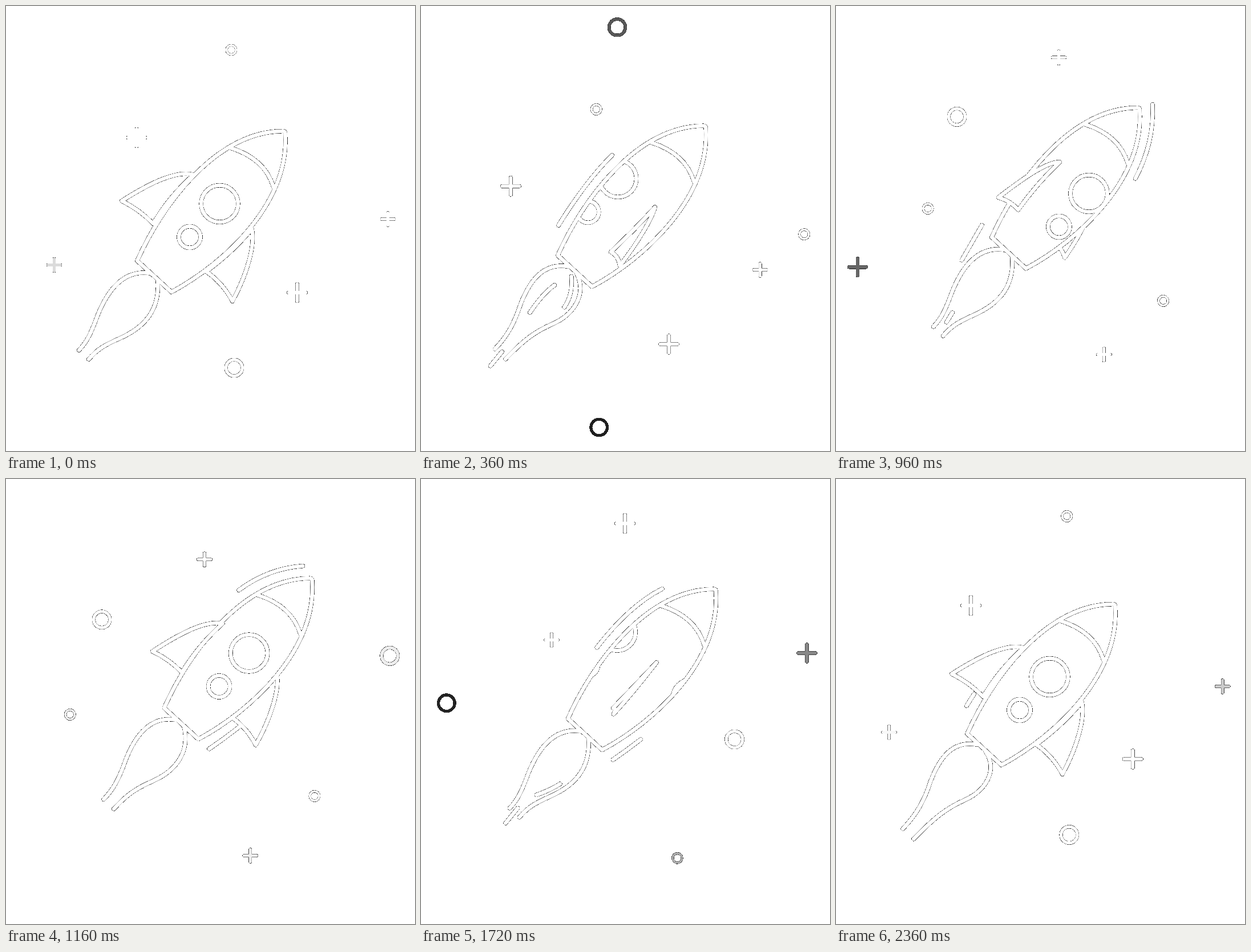
Write an HTML page with a canvas that moves like this. It is 717 by 781 pixels and loops after 2.4 s.

```html
<!DOCTYPE html>
<html lang="en">
<head>
<meta charset="utf-8">
<title>Rocket</title>
<style>
  html, body { margin: 0; width: 100%; height: 100%; overflow: hidden; background: #fff; }
  canvas { display: block; }
</style>
</head>
<body>
<canvas width="717" height="781"></canvas>
<script>
const W = 717, H = 781, LOOP = 2400, STEP = 40;
const ctx = document.querySelector('canvas').getContext('2d', { willReadFrequently: true });

// Shapes in rocket coordinates; pairs are the two ends of a morph
const BODY = new Path2D('M230 447C272 353 365 222 484 219.5Q490 219 489.5 224.5C497 346 383 452 290 502Z');
const NOSE = new Path2D('M394 249Q454 268 469 318');
const FIN = [
  'M431 391C437 420 423 470 397 518Q380 486 351 466Q399 431 431 391Z',
  'M329 296C300 288 255 309 203 342Q235 358 258 382Q287 333 329 296Z'
];
const FLAME = [
  'M252 469C205 462 178 500 161 542C148 577 142 589 128 604M266 480C270 530 247 562 200 583C175 594 160 602 145 620',
  'M247 466C205 458 182 488 166 530C155 565 140 590 117 614M262 478C286 512 260 548 228 562C196 576 175 592 136 632'
];

// Speed lines: each dash runs down its path once per lap
const streak = (d, length, first, lap) => ({ path: new Path2D(d), length, first, lap });
const STREAK_SPEED = 1.35;
const STREAKS = [
  streak('M473 198C400 203 325 242 229 398', 155, 120, 475),
  streak('M473 198C430 204 385 222 352 251C312 282 310 305 228 351', 155, 1181, LOOP),
  streak('M230 396L172 497', 71, 882, 1046),
  streak('M512 214C518 330 440 430 309 519', 136, 860, 520),
  streak('M243 489C205 505 185 540 151 596', 65, 296, 524),
  streak('M254 484C258 530 235 560 175 581', 76, 318, 426),
  streak('M142 604L112 641', 45, 315, 345)
];

// Stars drift down-left on parallel lines; x, y is the place at time 0
const STAR_SLOPE = 1.19;
const star = (draw, big, x, y, birth, death, speed, speedAfter = speed) =>
  ({ draw, big, x, y, birth, death, speed, speedAfter });
const STARS = [
  star(ring, false, 395, 77, -205, 1490, 0.2437),
  star(ring, true, 423.2, -57, 308, 1768, 0.22),
  star(ring, true, 400, 635, -1380, 403, 0.22, 0.244),
  star(ring, false, 730.6, 330.6, 150, 1960, 0.1635),
  star(plus, false, 84.5, 454.5, -1680, 300, 0.2125),
  star(plus, true, 229, 231, -880, 1100, 0.189, 0.199),
  star(plus, true, 510.5, 503, -760, 870, 0.244, 0.211),
  star(plus, false, 669.5, 374, -160, 1490, 0.208)
];

const clamp = v => Math.max(0, Math.min(1, v));

function morph([from, to], k) {
  const number = /[\d.]+/g, target = to.match(number);
  let i = 0;
  return new Path2D(from.replace(number, n => +n + (target[i++] - n) * k));
}

function solid(path) {
  ctx.fillStyle = '#000';
  ctx.fill(path);
  ctx.stroke(path);
}

function circle(x, y, r) {
  ctx.beginPath();
  ctx.arc(x, y, r, 0, 2 * Math.PI);
  ctx.stroke();
}

function ring(x, y, big) {
  ctx.lineWidth = big ? 5.5 : 3.8;
  circle(x, y, big ? 14.3 : 8.2);
}

function plus(x, y, big) {
  const arm = big ? 15 : 11;
  ctx.lineWidth = big ? 6 : 5;
  ctx.stroke(new Path2D(`M${x - arm} ${y}h${2 * arm}M${x} ${y - arm}v${2 * arm}`));
}

function drawStar({ draw, big, x, y, birth, death, speed, speedAfter }, time) {
  const t = time > death ? time - LOOP : time;
  if (t < birth) return;
  const level = 255 * clamp(Math.min((t - birth) / 150, (death - t) / 350));
  const drift = t * (t < 0 ? speed : speedAfter);
  ctx.strokeStyle = `rgb(${level}, ${level}, ${level})`;
  draw(x - drift, y + STAR_SLOPE * drift, big);
}

function drawStreak({ path, length, first, lap }, t) {
  if (t <= first) return;
  const head = (t - first) % lap * STREAK_SPEED;
  ctx.setLineDash([length, 9999]);
  ctx.lineDashOffset = length - head;
  if (head > 0) ctx.stroke(path);
  ctx.setLineDash([]);
}

function drawRocket(t) {
  const turns = t < 1200 ? t / 1200 : 1 + (t - 1200) / 1160;
  const spin = turns % 1;
  const lift = 23.7 * (1 - Math.cos(Math.PI * turns));
  const flicker = clamp(0.9 - Math.cos(2 * Math.PI * t / 95.4));
  ctx.save();
  ctx.translate(lift, -0.96 * lift);
  ctx.strokeStyle = '#fff';
  ctx.lineWidth = 6.8;

  ctx.stroke(morph(FLAME, flicker));
  STREAKS.forEach(s => drawStreak(s, t));
  solid(morph(FIN, 1 - spin));
  solid(BODY);
  ctx.stroke(NOSE);

  // Portholes slide across the hull as it turns
  ctx.save();
  ctx.clip(BODY);
  for (const shift of [-174 * spin, 174 * (1 - spin)]) {
    const dx = 0.748 * shift, dy = 0.664 * shift;
    circle(374.5 + dx, 347 + dy, 32.4);
    circle(322 + dx, 405.5 + dy, 19);
  }
  ctx.restore();

  solid(morph(FIN, spin));
  ctx.restore();
}

// Unlit pixels become white paper, leaving only the soft edges of the white lines
function clearDark() {
  const image = ctx.getImageData(0, 0, W, H), px = image.data;
  for (let i = 0; i < px.length; i += 4) {
    if (px[i] < 20) px[i] = px[i + 1] = px[i + 2] = 255;
  }
  ctx.putImageData(image, 0, 0);
}

let shown = -1;
const origin = performance.now();
function frame() {
  const t = Math.floor((performance.now() - origin) % LOOP / STEP) * STEP;
  if (t !== shown) {
    shown = t;
    ctx.fillStyle = '#000';
    ctx.fillRect(0, 0, W, H);
    ctx.lineCap = ctx.lineJoin = 'round';
    STARS.forEach(s => drawStar(s, t));
    drawRocket(t);
    clearDark();
  }
  requestAnimationFrame(frame);
}
frame();
</script>
</body>
</html>
```
